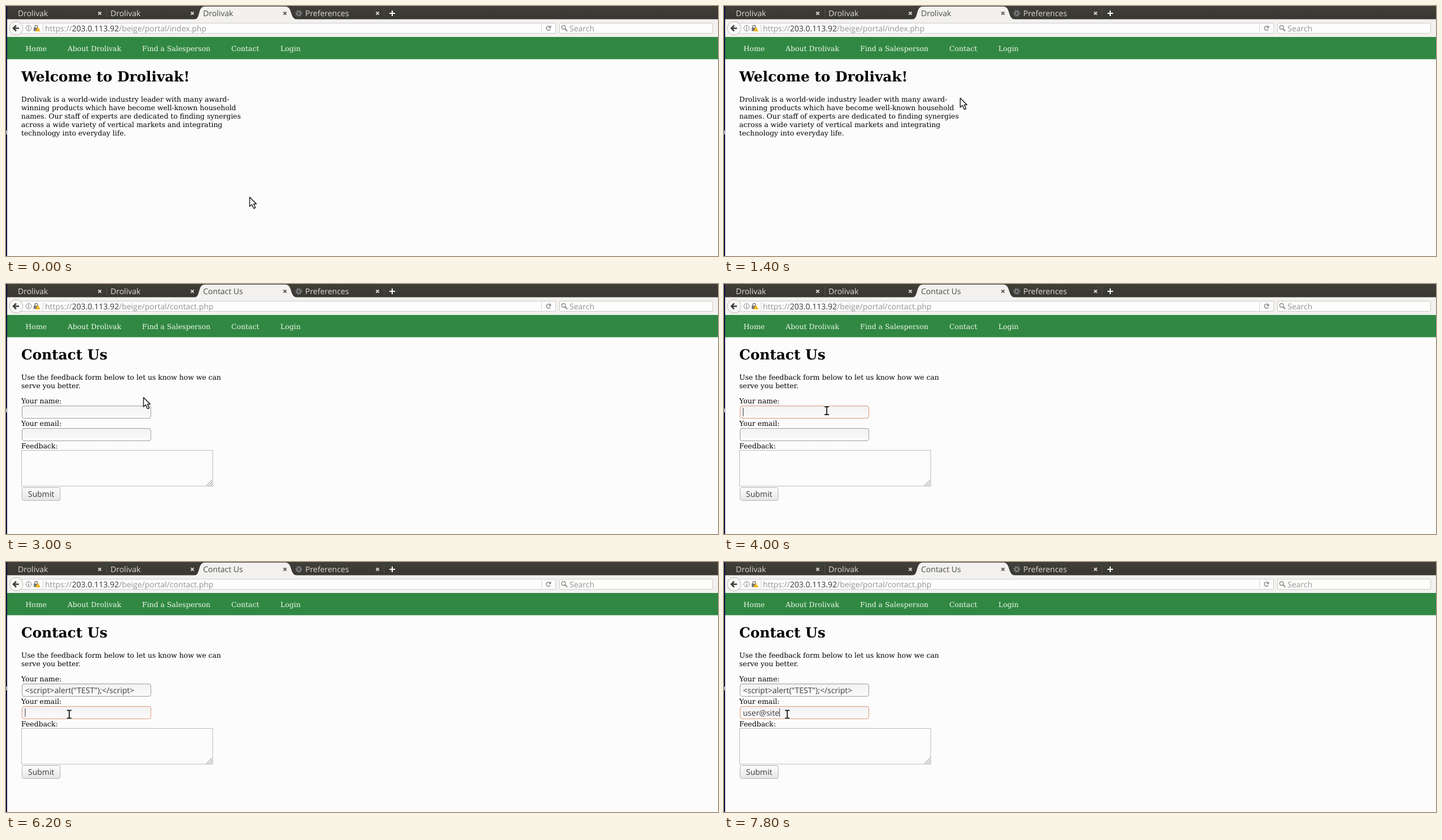
An HTML page for the animation above (8000 ms loop, 1261 by 444 pixels).

```html
<!DOCTYPE html>
<html lang="en">
<head>
<meta charset="utf-8">
<title>Contact form</title>
<style>
  html, body { margin: 0; width: 100%; height: 100%; overflow: hidden; background: #fcfcfc; }
  svg { display: block; width: 100vw; height: 100vh; }
  text { font: 14px "Open Sans", "Noto Sans", sans-serif; fill: #3c3c3c; text-rendering: geometricPrecision; }
  .tabs text { fill: #dfdbd2; }
  .tabs .active { fill: #4c4c4c; }
  .dim { fill: #949494; }
  .nav text, .page text { font: 12.48px "DejaVu Serif", serif; fill: #000; }
  .nav text { fill: #f3f8ee; }
  .page .title { font-size: 24.8px; font-weight: bold; }
  .page .body { font-size: 12.36px; }
  .page .field { font: 14px "Open Sans", "Noto Sans", sans-serif; fill: #3c3c3c; }
  .input { fill: url(#inset); stroke: #a19d94; }
  .input.focus { stroke: #de9878; }
  .line { fill: none; stroke: #808080; }
  .cursor { fill: #fff; stroke: #222; stroke-width: 1.5; stroke-linejoin: round; }
</style>
</head>
<body>
<svg viewBox="0 0 1261 444" preserveAspectRatio="none">
  <defs>
    <linearGradient id="bar" x2="0" y2="1"><stop stop-color="#403f3a"/><stop offset="1" stop-color="#373631"/></linearGradient>
    <linearGradient id="inset" x2="0" y2="1"><stop stop-color="#f2f2f1"/><stop offset="1" stop-color="#fbfbfb"/></linearGradient>
    <linearGradient id="raised" x2="0" y2="1"><stop stop-color="#fcfcfc"/><stop offset="1" stop-color="#e7e6e4"/></linearGradient>
    <path id="cross" d="M-2.6-2.6 2.6 2.6M2.6-2.6-2.6 2.6"/>
  </defs>
  <rect width="1261" height="444" fill="#fcfcfc"/>

  <g class="tabs">
    <rect width="1261" height="24" fill="url(#bar)"/>
    <rect y="23.5" width="1261" height="31.5" fill="#f2f1ef"/>
    <path d="M333 24C345 24 339 1 352 1H495C508 1 502 24 516 24Z" fill="#f2f1ef"/>
    <path d="M178.5 5V21M669.5 5V21" stroke="#6b6963" stroke-dasharray="1 1"/>
    <text x="21" y="18">Drolivak</text>
    <text x="185" y="18">Drolivak</text>
    <text id="tabTitle" class="active" y="18"></text>
    <text x="530" y="18">Preferences</text>
    <g stroke="#dfdbd2" stroke-width="1.9">
      <use href="#cross" x="166" y="13"/><use href="#cross" x="330" y="13"/>
      <use href="#cross" x="494" y="13" stroke="#5a5955"/><use href="#cross" x="658" y="13"/>
      <path d="M679 13H689M684 8V18" stroke="#fff" stroke-width="2"/>
    </g>
    <g fill="none" stroke="#74777a">
      <circle cx="518.5" cy="13" r="3.2" stroke-width="2.6"/>
      <circle cx="518.5" cy="13" r="5.2" stroke-width="2" stroke-dasharray="2 2.08"/>
    </g>
    <g id="spinner" fill="none" stroke-width="2.4">
      <circle r="5.2" stroke="#bfe0f5"/>
      <path d="M0-5.2A5.2 5.2 0 1 0 5.2 0" stroke="#2a9fe8"/>
    </g>
  </g>

  <g>
    <rect x="18.5" y="30.5" width="955" height="18" rx="1.5" fill="#fdfdfd" stroke="#cfccd0"/>
    <rect x="980.5" y="30.5" width="271" height="18" rx="1.5" fill="#fdfdfd" stroke="#cfccc0"/>
    <circle cx="18" cy="39.5" r="12" fill="#f8f7f6" stroke="#bdbab5"/>
    <path d="M23 39.5H14M18 34.5 13 39.5 18 44.5" fill="none" stroke="#3c3c3c" stroke-width="2.5"/>
    <circle class="line" cx="40" cy="39.5" r="4.8"/>
    <path class="line" d="M40 38.5V42.5M40 36V37.3" stroke-width="1.4"/>
    <path class="line" d="M51 39V37A2.5 2.5 0 0 1 56 37V39" stroke-width="1.5"/>
    <rect x="49" y="38.5" width="8" height="6" fill="#777"/>
    <path d="M56.5 37 61 45H52Z" fill="#f3b51b"/>
    <path d="M65.5 32V47M948.5 32V47" stroke="#d6d4d2"/>
    <text x="69" y="44.5" class="dim">https://<tspan fill="#333">203.0.113.92</tspan><tspan id="path"></tspan></text>
    <path id="reload" class="line" d="M963.8 37A3.8 3.8 0 1 0 964 41.5M964.5 35V38.5H961" stroke-width="1.4"/>
    <use id="stop" href="#cross" transform="translate(961 39.5) scale(1.25)" stroke="#777" stroke-width="1.1"/>
    <circle class="line" cx="987.5" cy="38" r="3.3" stroke-width="1.3"/>
    <path class="line" d="M990 40.5 994 44.5" stroke-width="1.8"/>
    <text x="998" y="44.5" class="dim">Search</text>
  </g>

  <g class="nav">
    <rect y="55" width="1261" height="39.5" fill="#308842"/>
    <text x="34.5" y="80">Home</text>
    <text x="109" y="80">About Drolivak</text>
    <text x="241" y="80">Find a Salesperson</text>
    <text x="399" y="80">Contact</text>
    <text x="486" y="80">Login</text>
  </g>

  <g class="page" id="home">
    <text class="title" x="27" y="134">Welcome to Drolivak!</text>
    <text class="body" y="169.5">
      <tspan x="27">Drolivak is a world-wide industry leader with many award-</tspan>
      <tspan x="27" dy="15">winning products which have become well-known household</tspan>
      <tspan x="27" dy="15">names. Our staff of experts are dedicated to finding synergies</tspan>
      <tspan x="27" dy="15">across a wide variety of vertical markets and integrating</tspan>
      <tspan x="27" dy="15">technology into everyday life.</tspan>
    </text>
  </g>

  <g class="page" id="contact">
    <text class="title" x="27" y="134">Contact Us</text>
    <text class="body" y="169.5">
      <tspan x="27">Use the feedback form below to let us know how we can</tspan>
      <tspan x="27" dy="15">serve you better.</tspan>
    </text>
    <text x="27" y="212">Your name:</text>
    <rect id="nameBox" class="input" x="28.5" y="216.5" width="228" height="22" rx="3.5"/>
    <text id="name" class="field" x="33.5" y="232.5"></text>
    <text x="27" y="251.5">Your email:</text>
    <rect id="emailBox" class="input" x="28.5" y="256.5" width="228" height="22" rx="3.5"/>
    <text id="email" class="field" x="33.5" y="272.5"></text>
    <text x="27" y="291.5">Feedback:</text>
    <rect x="27.5" y="295.5" width="338.5" height="63.5" fill="#fcfcfc" stroke="#bcb9c4"/>
    <path class="line" d="M354.5 358.5 365.5 347.5M358.5 358.5 365.5 351.5M362.5 358.5 365.5 355.5"/>
    <rect x="28.5" y="361.5" width="67.5" height="23" rx="3" fill="url(#raised)" stroke="#b5b2ad"/>
    <text class="field" x="39" y="378">Submit</text>
    <path id="caret" d="M0 0V15" stroke="#333"/>
  </g>

  <rect width="2" height="444" fill="#0b0f3d"/>
  <rect y="221" width="1.5" height="7" fill="#d8d8dc"/>

  <g id="pointer">
    <path id="arrow" class="cursor" d="M.5.5V17L4.5 13.5 7.7 20.5 10.7 19.2 7.6 12.4H12.3Z"/>
    <path id="hand" class="cursor" d="M-2 9V1.5Q-2-.5 0-.5T2 1.5V6.5L8 7.5Q10.5 8 10.3 11L9.5 17.3H-.5L-5 12Q-6 9.5-4 9Z"/>
    <g id="beam" fill="none">
      <path d="M-4-7H4M0-7V7M-4 7H4" stroke="#fff" stroke-width="4"/>
      <path d="M-4-7H-1L0-6 1-7H4M0-6V6M-4 7H-1L0 6 1 7H4" stroke="#222" stroke-width="1.9"/>
    </g>
  </g>
</svg>
<script>
const LOOP = 8000, STEP = 200;
const CLICK = 2000, LOADED = 2600, FOCUS_NAME = 3800, PASTE = 4800, FOCUS_EMAIL = 6000, TYPE = 6200, KEY_TIME = 170;
const NAME = '<script>alert("TEST");<\/script>', EMAIL = 'user@site';
// time, x, y of the pointer tip
const route = [
  [0, 431, 339], [800, 423, 298], [1800, 414.5, 73], [2400, 414.5, 73],
  [3000, 243, 201], [3600, 182, 225], [5400, 182, 225], [6000, 112, 270.5], [LOOP, 112, 270.5]
];

const el = id => document.getElementById(id);
const show = (id, on) => el(id).style.display = on ? '' : 'none';
const write = (id, text) => el(id).textContent = text;

function pointerAt(t) {
  const i = route.findIndex(p => p[0] > t);
  const [t0, x0, y0] = route[i - 1], [t1, x1, y1] = route[i];
  const k = (t - t0) / (t1 - t0);
  return [x0 + (x1 - x0) * k, y0 + (y1 - y0) * k];
}

function drawPointer(t) {
  const [x, y] = pointerAt(t);
  const overLink = y > 66 && y < 88 && x > 399 && x < 449;
  const overInput = t >= LOADED && x > 28 && x < 257 && (y > 216 && y < 239 || y > 256 && y < 279);
  el('pointer').setAttribute('transform', `translate(${x} ${y})`);
  show('hand', overLink);
  show('beam', overInput);
  show('arrow', !overLink && !overInput);
}

function drawBrowser(t) {
  const loading = t >= CLICK && t < LOADED;
  write('tabTitle', loading ? 'Connecting…' : t < CLICK ? 'Drolivak' : 'Contact Us');
  el('tabTitle').setAttribute('x', loading ? 366 : 349);
  write('path', `/beige/portal/${t < CLICK ? 'index' : 'contact'}.php`);
  show('spinner', loading);
  show('stop', loading);
  show('reload', !loading);
  el('spinner').setAttribute('transform', `translate(355 13) rotate(${(t - CLICK - STEP) * 0.36})`);
  show('home', t < LOADED);
  show('contact', t >= LOADED);
}

function drawForm(t) {
  const focus = t >= FOCUS_EMAIL ? 'email' : t >= FOCUS_NAME ? 'name' : '';
  write('name', t >= PASTE ? NAME : '');
  write('email', EMAIL.slice(0, Math.max(0, Math.floor((t - TYPE) / KEY_TIME))));
  for (const id of ['name', 'email']) el(id + 'Box').classList.toggle('focus', id === focus);
  show('caret', focus && (t > TYPE || t % 1000 < 500));
  if (!focus) return;
  const x = 34 + el(focus).getComputedTextLength();
  el('caret').setAttribute('transform', `translate(${x} ${focus === 'name' ? 220 : 260})`);
}

function frame(now) {
  const t = Math.floor(now % LOOP / STEP) * STEP;
  drawBrowser(t);
  drawForm(t);
  drawPointer(t);
  requestAnimationFrame(frame);
}
frame(performance.now());
</script>
</body>
</html>
```
